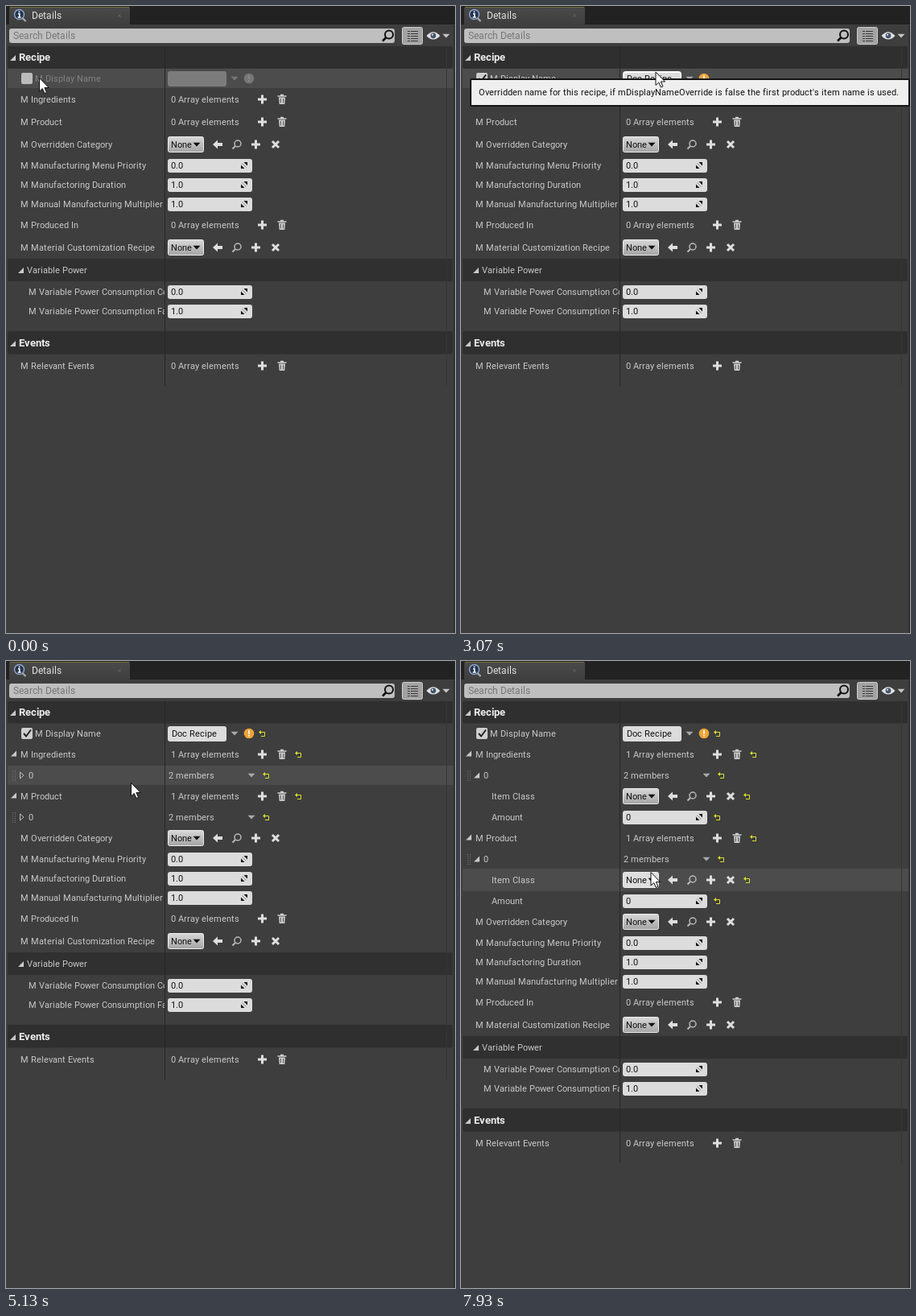
Animation of 558x779 px, one loop 8 s. Source, as an HTML page:

```html
<!DOCTYPE html>
<html lang="en">
<head>
<meta charset="utf-8">
<title>Details panel</title>
<style>
html, body { margin: 0; width: 558px; height: 779px; overflow: hidden; background: #3e3e3e; }
svg { display: block; }
text { white-space: pre; }
</style>
</head>
<body>
<svg id="stage" width="558" height="779" viewBox="0 0 558 779">
  <defs>
    <clipPath id="labelClip"><rect width="197" height="779"/></clipPath>
    <clipPath id="listClip"><rect id="listBox" y="50" width="558" height="729"/></clipPath>
    <linearGradient id="btn" x2="0" y2="1"><stop stop-color="#d8d8d8"/><stop offset="1" stop-color="#a4a4a4"/></linearGradient>
    <linearGradient id="tab" x2="0" y2="1"><stop stop-color="#4a4a4a"/><stop offset="1" stop-color="#3e3e3e"/></linearGradient>
  </defs>
  <rect width="558" height="779" fill="#3e3e3e"/>
  <g id="chrome"></g>
  <g id="list" clip-path="url(#listClip)"></g>
  <rect id="bar" x="542" y="52" width="10" height="418" rx="1" fill="#fff"/>
  <g id="tip"></g>
  <path id="cursor" d="M0 0V16.5L3.8 13L6.4 19L9 17.9L6.4 12H11.6Z" fill="#fff" stroke="#111" stroke-width="1"/>
</svg>
<script>
const LOOP = 8000;
const NAME = 'Doc Recipe';
const TYPED = [1730, 1800, 1930, 2070, 2200, 2330, 2530, 2600, 2730, 2800];
const PATH = [
  [0, 41.5, 89.5], [70, 41.5, 89.5], [530, 26, 86], [740, 26, 86], [1000, 150, 77],
  [1270, 242, 81.5], [3200, 242, 82], [3600, 196, 185], [3730, 195, 179], [3870, 207, 172],
  [4200, 317, 114], [4400, 317, 114], [4670, 318, 165], [4800, 318, 165], [5130, 156, 151.5],
  [5400, 20, 140], [5600, 20, 140], [6200, 108, 185], [6330, 108, 185], [6400, 80, 190],
  [6470, 80, 190], [6870, 36, 243], [7070, 36, 243], [7200, 19, 244], [7330, 19, 244],
  [7800, 236, 262.5], [LOOP, 236, 262.5]
];
const $ = id => document.getElementById(id);
const pen = document.createElement('canvas').getContext('2d');
const BODY = '11px Roboto, sans-serif', BIG = '12px Roboto, sans-serif', HEAD = 'bold 13px Roboto, sans-serif';
const LIGHT = '#c9c9c9', INK = '#111', YELLOW = '#dfe02c';

// every glyph advances by whole pixels, as in hinted interface text
function stops(s, x, font = BODY) {
  pen.font = font;
  return [...s].reduce((xs, c) => [...xs, xs[xs.length - 1] + Math.round(pen.measureText(c).width)], [x]);
}

// drawing helpers
const text = (x, y, s, fill = LIGHT, font = BODY) =>
  `<text x="${stops(s, x, font).slice(0, -1).join(' ')}" y="${y}" fill="${fill}" style="font:${font}">${s}</text>`;
const rect = (x, y, w, h, fill, more = '') => `<rect x="${x}" y="${y}" width="${w}" height="${h}" fill="${fill}" ${more}/>`;
const path = (d, fill, more = '') => `<path d="${d}" fill="${fill}" ${more}/>`;
const line = (d, color, w = 1) => path(d, 'none', `stroke="${color}" stroke-width="${w}"`);
const at = (x, y, s) => `<g transform="translate(${x} ${y})">${s}</g>`;

// icons, drawn around their centre
const down = (x, y, color = '#a9a9a9') => path(`M${x - 4.5} ${y - 2.3}h9l-4.5 4.8z`, color);
const opened = (x, y) => path(`M${x + .5} ${y + 3.5}h7v-7z`, LIGHT);
const closed = (x, y) => line(`M${x} ${y - 4}v8l4.5 -4z`, '#bdbdbd');
const plus = (x, y) => line(`M${x - 5.5} ${y}h11M${x} ${y - 5.5}v11`, '#dedede', 3);
const cross = (x, y) => line(`M${x - 4} ${y - 4}l8 8M${x + 4} ${y - 4}l-8 8`, '#dedede', 3);
const back = (x, y) => path(`M${x - 6} ${y}l6 -5.5v3.5h6v4h-6v3.5z`, '#dedede');
const lens = (x, y) => `<circle cx="${x + 1}" cy="${y - 1}" r="4" fill="none" stroke="#bababa" stroke-width="1.5"/>` +
  line(`M${x - 2} ${y + 2}l-3.5 3.5`, '#bababa', 2);
const trash = (x, y) => at(x, y, path('M-4 -2.5h8l-.7 8.5h-6.6z', '#d0d0d0') +
  line('M-5.5 -4h11M-2 -5.5h4', '#d0d0d0', 1.5) + line('M-1.7 -1v5.5M1.7 -1v5.5', '#4b4b4b'));
const revert = (x, y) => at(x, y, line('M-2 -1.5H3.5V3.5H-1', YELLOW) + path('M-4 -1.5l3 -2.5v5z', YELLOW));

const spin = (y, v) => rect(201, y - 8, 105, 17, '#dcdcdc', 'rx="3"') + text(205, y + 4, v, INK) +
  at(296, y, path('M-.5 -4H4V.5zM.5 4H-4V-.5z', INK) + line('M-2.5 -2.5l5 5', '#777', .8));
const picker = (y, lit) => rect(201.5, y - 9.5, 44, 19, lit ? '#dedede' : 'url(#btn)', 'rx="2" stroke="#ececec"') +
  text(205, y + 4, 'None', INK) + down(237, y, INK) +
  back(263, y) + lens(287, y) + plus(310.5, y) + cross(335, y);
const array = (y, n) => text(205, y + 4, n + ' Array elements') + plus(318.5, y) + trash(343, y);

function nameBox(y, s) {
  const typed = NAME.slice(0, s.typed);
  const end = stops(typed, 206).pop();
  const fill = s.on ? '#dcdcdc' : '#7c7c7c';
  return (s.focus ? rect(202, y - 8, 71, 17, fill, 'rx="3" stroke="#fff" stroke-width="2"')
    : rect(201, y - 9, 73, 19, fill, 'rx="3"')) +
    text(206, y + 4, typed, INK) +
    (s.caret ? line(`M${end + .5} ${y - 6}v12`, INK) : '') +
    down(284, y, s.on ? '#a9a9a9' : '#777') +
    `<circle cx="302" cy="${y}" r="6.3" fill="${s.on ? '#f0a336' : '#777'}"/>` +
    line(`M302 ${y - 4}v4.7M302 ${y + 2}v1.8`, s.on ? '#fff' : '#8b8b8b', 1.7) +
    (s.added ? revert(318, y) : '');
}

function element(id, open) {
  const out = [{ id, h: 24, x: 28, label: '0', draw: y =>
    [0, 1, 2, 3, 4, 5].map(i => rect(8, y - 6 + i * 2.4, 1, 1, '#777') + rect(11, y - 6 + i * 2.4, 1, 1, '#777')).join('') +
    (open ? opened(15.5, y) : closed(17.5, y)) + text(202, y + 4, '2 members') + down(305, y) + revert(323, y) }];
  if (open) out.push(
    { id: id + 'class', h: 28, x: 38, label: 'Item Class', draw: (y, s) => picker(y, id === 'p0' && s.lit) + revert(355, y) },
    { id: id + 'amount', h: 24, x: 38, label: 'Amount', draw: y => spin(y, '0') + revert(318, y) });
  return out;
}

function rows(s) {
  const num = (label, v, x = 18) => ({ id: label, h: 24, x, label, draw: y => spin(y, v) });
  const pick = label => ({ id: label, h: 28, x: 18, label, draw: y => picker(y) });
  const arr = (label, n) => ({ id: label, h: 28, x: 18, label,
    draw: y => array(y, n) + (n ? opened(5.5, y - 1) + revert(363, y) : '') });
  const head = label => ({ h: 28, head: label });
  return [
    head('Recipe'),
    { id: 'name', h: 24, x: 36, label: 'M Display Name', dim: !s.on, draw: y =>
      rect(19, y - 7, 14, 14, s.on ? '#cfcfcf' : '#bcbcbc', 'rx="2"') +
      (s.on ? line(`M22 ${y}l3 3.5l6 -8`, '#222', 2) : '') + nameBox(y, s) },
    arr('M Ingredients', s.ing), ...(s.ing ? element('i0', s.ingOpen) : []),
    arr('M Product', s.prod), ...(s.prod ? element('p0', s.prodOpen) : []),
    pick('M Overridden Category'),
    num('M Manufacturing Menu Priority', '0.0'),
    num('M Manufactoring Duration', '1.0'),
    num('M Manual Manufacturing Multiplier', '1.0'),
    arr('M Produced In', 0),
    pick('M Material Customization Recipe'),
    { h: 29, sub: 'Variable Power' },
    num('M Variable Power Consumption Constant', '0.0', 28),
    num('M Variable Power Consumption Factor', '1.0', 28),
    { h: 14 },
    head('Events'),
    arr('M Relevant Events', 0),
    { h: 11 }
  ];
}

function layout(s) {
  let y = 50;
  return rows(s).map(r => {
    r.y = y;
    y += r.h;
    return r;
  });
}

function drawList(list, hover, s) {
  const last = list[list.length - 1], end = last.y + last.h;
  let under = '', labels = '', over = '';
  for (const r of list) {
    const c = r.y + r.h / 2;
    if (r.head) {
      under += rect(2, r.y - 1, 553, 28.5, '#2f2f2f', 'rx="2"');
      over += opened(4.5, r.y + 14.5) + text(16, r.y + 18, r.head, '#ececec', HEAD);
    } else if (r.sub) {
      under += rect(2, r.y, 553, 28, '#303030');
      over += opened(14.5, r.y + 14.5) + text(26, r.y + 18, r.sub);
    } else if (r.id) {
      if (r.id === hover) under += rect(2, r.y, 554, r.h, '#4c4c4c');
      labels += text(r.x, c + 4, r.label, r.dim ? '#828282' : LIGHT);
      over += r.draw(c, s);
    }
  }
  return under + line(`M197.5 50V${end}`, '#262626') + line(`M547.5 50V${end}`, '#353535') +
    `<g clip-path="url(#labelClip)">${labels}</g>` + over;
}

function drawChrome() {
  let grid = '';
  for (let y = 31; y < 45; y += 3) grid += rect(499, y, 3, 1, '#3a3a3a') + rect(503, y, 9, 1, '#3a3a3a');
  return rect(0, 0, 558, 23, '#222') + path('M4 24V3q0 -2 2 -2H152q2 0 2 2V24z', 'url(#tab)') +
    line('M5 1.5H153', '#77703f') + rect(0, 23, 558, 27, '#3e3e3e') +
    `<circle cx="16.5" cy="10.5" r="6" fill="#24344e" stroke="#8fa6cd" stroke-width="1.5"/>` +
    line('M20.5 15l4 4', '#a9a9a9', 2.3) +
    line('M16.5 6.5v1.8M15 9.8h1.8v4M14.6 14h4', '#fff', 1.6) +
    text(32, 16, 'Details', '#e0e0e0', BIG) + line('M139 10l4 4M143 10l-4 4', '#5e5e5e') +
    rect(4, 28, 479, 18, '#bfbfbf', 'rx="3"') + text(9, 41, 'Search Details', '#777', BIG) +
    `<circle cx="476" cy="35.5" r="5" fill="none" stroke="#111" stroke-width="2"/>` + line('M472.5 39l-4.5 4.5', INK, 2.6) +
    rect(492.5, 26.5, 25, 21, '#a2a2a2', 'rx="2" stroke="#cfcfcf"') + grid +
    path('M522.5 37q8.5 -9.5 17 0q-8.5 9 -17 0z', '#e2e2e2') +
    '<circle cx="531" cy="36.8" r="3.4" fill="#43546d"/><circle cx="530" cy="35.7" r="1" fill="#fff"/>' + down(547, 37, '#c4c4c4') +
    rect(556.5, 24, 1.5, 755, '#2b2b2b');
}

function cursorAt(t) {
  const i = PATH.findIndex(p => p[0] > t), a = PATH[i - 1], b = PATH[i];
  const k = (t - a[0]) / (b[0] - a[0]);
  return [a[1] + (b[1] - a[1]) * k, a[2] + (b[2] - a[2]) * k];
}

const span = (t, a, b) => t >= a && t < b;
const fade = (t, a, b) => span(t, a, b) ? Math.min(1, (t - a + 50) / 200) : 0;
let shown = '';

function render(t) {
  const [x, y] = cursorAt(t);
  const s = {
    on: t >= 740, focus: span(t, 1270, 4330), added: t >= 4330,
    typed: TYPED.filter(k => k <= t).length,
    caret: span(t, 1730, 3070) || span(t, 3530, 4330),
    ing: +(t >= 4330), prod: +(t >= 4800),
    ingOpen: t >= 6270, prodOpen: t >= 7270, lit: t >= 7930
  };
  const list = layout(s);
  const settling = span(t, 4800, 4930) || span(t, 6270, 6340);
  const under = list.find(r => r.id && y >= r.y && y < r.y + r.h);
  // the old hover row lingers while the list grows
  const hover = span(t, 6270, 6340) ? 'p0' : y < 79 ? 'name' : under && under.id;
  const key = JSON.stringify([s, hover]);
  if (key !== shown) {
    $('list').innerHTML = drawList(list, hover, s);
    shown = key;
  }
  $('listBox').setAttribute('height', settling ? (t < 5000 ? 448 : 472) : 729);
  $('bar').setAttribute('visibility', settling ? 'visible' : 'hidden');
  $('tip').setAttribute('opacity', fade(t, 70, 740) || fade(t, 1530, 3210));
  $('tip').setAttribute('transform', `translate(11 ${Math.round(y + 8)})`);
  $('cursor').setAttribute('transform', `translate(${x} ${y})`);
}

$('chrome').innerHTML = drawChrome();
$('tip').innerHTML = rect(0, 0, 547, 35, '#161616', 'rx="2"') + rect(2, 2, 543, 31, '#efefef') +
  text(11, 21, "Overridden name for this recipe, if mDisplayNameOverride is false the first product's item name is used.", INK);

const start = performance.now();
function tick() {
  render((performance.now() - start) % LOOP);
  requestAnimationFrame(tick);
}
tick();
</script>
</body>
</html>
```
